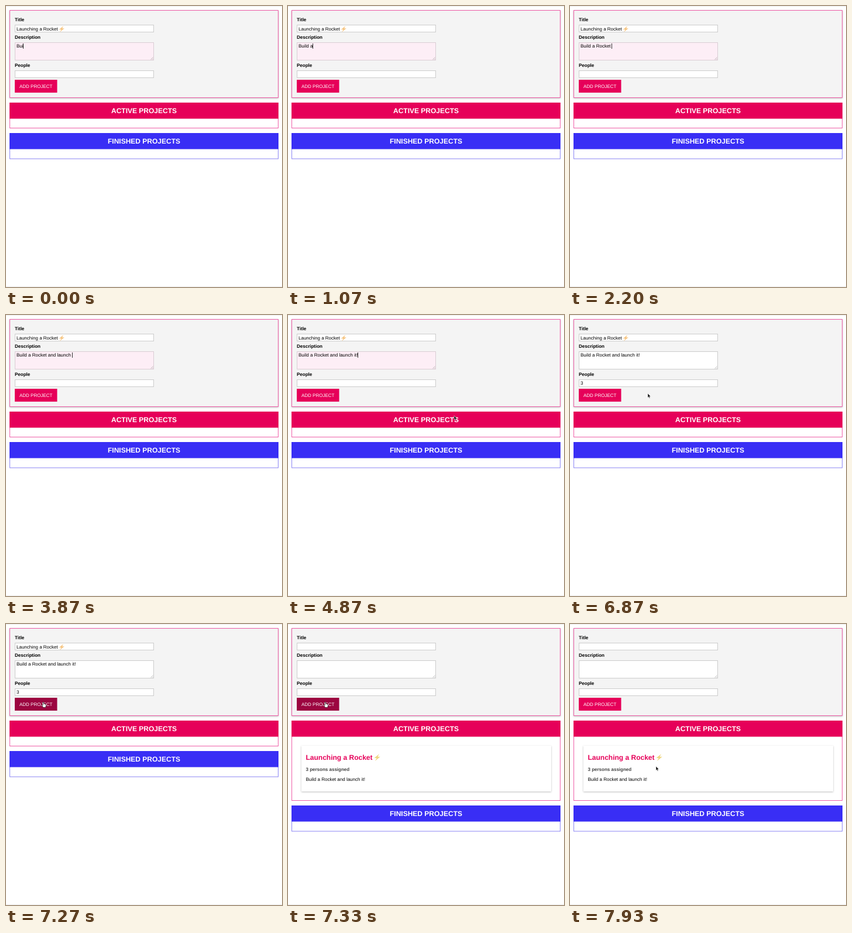
Recreate the animation shown at these times as an HTML page. Size 472 by 480 pixels, loop 8 s.

```html
<!DOCTYPE html>
<html>
<head>
<meta charset="utf-8">
<style>
html, body { margin: 0; width: 100%; height: 100%; overflow: hidden; background: #fff; }
svg { display: block; }
text { font: 8px "Liberation Sans", Arial, sans-serif; text-rendering: geometricPrecision; }
.b { font-weight: bold; }
.h { font-weight: bold; font-size: 12px; }
.m { text-anchor: middle; fill: #fff; }
.field { fill: #fff; stroke: #ccc; }
.field.on { fill: #fdeef6; stroke: #dacdd4; }
.pink { fill: #e60059; }
.blue { fill: #392ef5; }
.edge { fill: none; stroke: #ee5fa8; }
</style>
</head>
<body>
<svg width="472" height="480" viewBox="0 0 472 480">
  <defs>
    <path id="bolt" d="M7.5 0L0 6.2H3.7L1.2 10.6L9 4.2H5.2Z"/>
    <filter id="soft" x="-5%" y="-10%" width="110%" height="125%">
      <feDropShadow dx="0" dy="1" stdDeviation="1.6" flood-opacity=".26"/>
    </filter>
  </defs>
  <path d="M0 .5H472M0 479.5H472" stroke="#eee"/>

  <rect x="6.5" y="7.5" width="459" height="149" fill="#f4f4f4" stroke="#ee5fa8" filter="url(#soft)"/>
  <text class="b" x="15" y="26">Title</text>
  <text class="b" x="15" y="56">Description</text>
  <text class="b" x="15" y="104">People</text>
  <rect class="field" x="15.5" y="32.5" width="237" height="12"/>
  <rect class="field" id="descBox" x="15.5" y="62.5" width="237" height="30"/>
  <path d="M247.5 91.5L251.5 87.5M249.8 91.8L251.8 89.8" stroke="#999" stroke-width=".6"/>
  <rect class="field" id="peopleBox" x="15.5" y="110.5" width="237" height="12"/>
  <g id="title">
    <text x="18" y="42">Launching a Rocket</text>
    <use href="#bolt" x="90.8" y="34" fill="#f6c583"/>
  </g>
  <text id="desc" x="18" y="71"></text>
  <text id="people" x="18" y="119"></text>
  <path id="spin" d="M243 115.2L245 112.4L247 115.2ZM243 117L245 119.8L247 117Z" fill="#444"/>
  <rect id="caret" width="1" height="9" fill="#333"/>
  <rect id="button" x="15" y="126" width="72.5" height="22"/>
  <text x="23" y="139.7" fill="#fff">ADD PROJECT</text>

  <rect class="edge" id="active" x="6.5" y="165.5" width="459"/>
  <rect class="pink" x="6" y="165" width="460" height="27.5"/>
  <text class="h m" x="236" y="182.7">ACTIVE PROJECTS</text>
  <g id="card">
    <rect x="23" y="208" width="427" height="78" fill="#fff" filter="url(#soft)"/>
    <text class="h pink" x="30.5" y="232">Launching a Rocket</text>
    <use href="#bolt" transform="translate(147.5 222) scale(1.13)" fill="#efd680"/>
    <text class="b" x="30.5" y="251" fill="#444">3 persons assigned</text>
    <text x="30.5" y="267.6">Build a Rocket and launch it!</text>
  </g>

  <g id="finished">
    <rect x="6.5" y="217.5" width="459" height="43.5" fill="none" stroke="#8b85f4"/>
    <rect class="blue" x="6" y="217" width="460" height="27.5"/>
    <text class="h m" x="236" y="235">FINISHED PROJECTS</text>
  </g>

  <g id="cursor" stroke-linejoin="round">
    <path id="arrow" d="M0 0V7.2L1.6 5.7L2.7 8.3L3.9 7.8L2.8 5.2H5Z" fill="#111" stroke="#fff" stroke-width=".5"/>
    <path id="beam" d="M-1.5 -4Q0 -4 0 -3V3Q0 4 -1.5 4M1.5 -4Q0 -4 0 -3V3Q0 4 1.5 4" fill="none" stroke="#333" stroke-width=".8"/>
    <path id="hand" d="M-.8 2V-2.2Q0 -3.2 .8 -2.2V.3L4 1.2Q4.7 1.5 4.5 3L3.7 6.5H-.2L-2.7 3Q-2.4 1.8 -.8 3Z" fill="#fff" stroke="#222" stroke-width=".7"/>
  </g>
</svg>
<script>
const $ = id => document.getElementById(id);
const show = (id, on) => $(id).style.display = on ? '' : 'none';

// All times are in ticks of 1/15 s
const LOOP = 120, BLUR = 101, SUBMIT = 110, FOCUS = 80, DIGIT = 93, REAPPEAR = 96;
const message = 'Build a Rocket and launch it!', started = 3;
const keys = [1, 3, 5, 16, 19, 22, 24, 26, 28, 29, 31, 33, 36, 38, 39, 40,
  44, 47, 49, 50, 52, 54, 58, 61, 63, 68];
const path = [[73, 284, 172], [75, 210, 150], [77, 110, 128], [79, 56, 114], [81, 53, 112],
  [96, 53, 112], [99, 90, 126], [103, 133, 134], [105, 133, 134], [109, 64, 136],
  [116, 64, 136], [119, 147, 243]];

function pointAt(n) {
  const i = Math.max(1, path.findIndex(p => p[0] >= n));
  const [a, x, y] = path[i - 1], [b, u, v] = path[i];
  const k = Math.max(0, (n - a) / (b - a));
  return [x + (u - x) * k, y + (v - y) * k];
}

function placeCaret(field, since, n) {
  const on = field && (n - since) % 16 < 8;
  show('caret', on);
  if (!on) return;
  const text = $(field);
  const width = text.textContent ? text.getComputedTextLength() : 0;
  $('caret').setAttribute('x', Math.floor(18 + width));
  $('caret').setAttribute('y', text.getAttribute('y') - 7);
}

function draw(n) {
  const sent = n >= SUBMIT;
  const typed = keys.filter(k => k <= n);
  const focus = n < FOCUS ? 'desc' : n < BLUR ? 'people' : '';
  $('desc').textContent = sent ? '' : message.slice(0, started + typed.length).replace(/ /g, '\u00a0');
  $('people').textContent = n >= DIGIT && !sent ? '3' : '';
  for (const f of ['desc', 'people']) $(f + 'Box').classList.toggle('on', f === focus);
  show('spin', focus === 'people');
  placeCaret(focus, focus === 'desc' ? typed.at(-1) || 0 : n < DIGIT ? FOCUS : DIGIT, n);

  show('title', !sent);
  show('card', sent);
  $('active').setAttribute('height', sent ? 136 : 43);
  $('finished').setAttribute('transform', `translate(0 ${sent ? 93 : 0})`);

  const [x, y] = pointAt(n);
  const inside = (l, t, r, b) => x > l && x < r && y > t && y < b;
  const hover = n >= path[0][0] && inside(15, 126, 87, 148);
  const beam = inside(15, 110, 252, 123);
  show('cursor', n >= path[0][0] && (n < DIGIT || n >= REAPPEAR));
  $('cursor').setAttribute('transform', `translate(${x} ${y})`);
  show('hand', hover);
  show('beam', beam);
  show('arrow', !hover && !beam);
  $('button').setAttribute('fill', hover ? '#9c0640' : '#e60059');
}

const start = performance.now();
function loop() {
  draw(Math.floor((performance.now() - start) * 0.015 + 0.06) % LOOP);
  requestAnimationFrame(loop);
}
loop();
</script>
</body>
</html>
```
